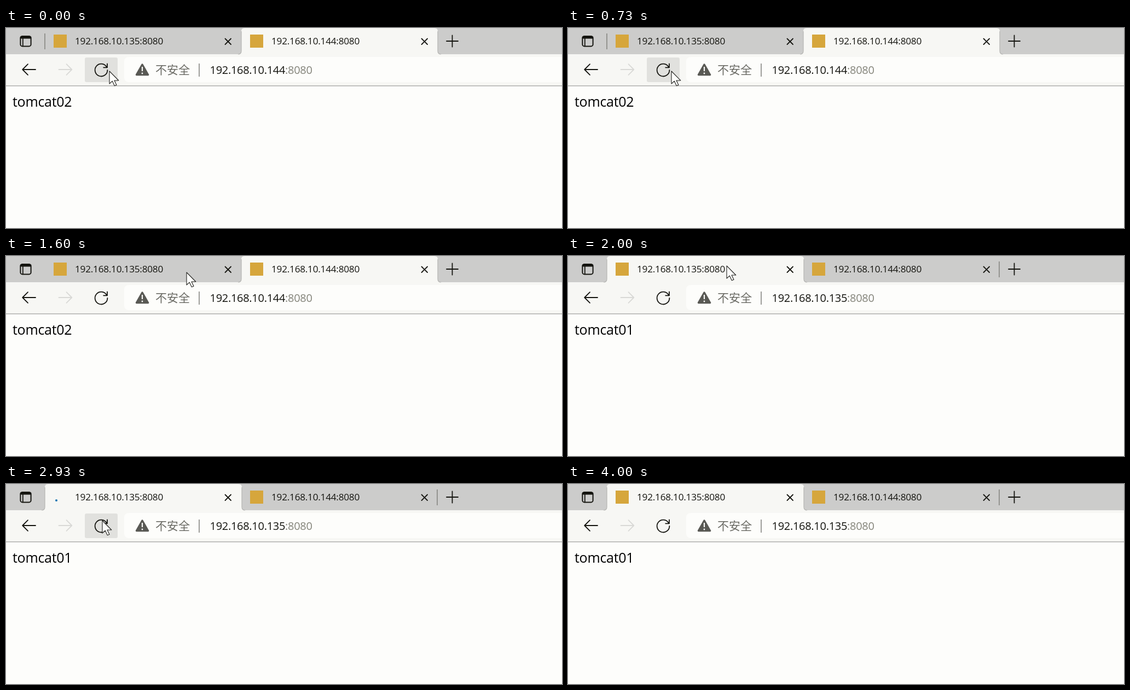
These frames come from a looping animation (1016 px wide and 366 px high, 4460 ms). An HTML page:

```html
<!DOCTYPE html>
<html lang="zh">
<head>
<meta charset="utf-8">
<title>Tabs</title>
<style>
html, body { margin: 0; width: 100%; height: 100%; overflow: hidden; background: #fdfdfb; }
svg { display: block; width: 1016px; height: 366px; }
text { font-family: "Open Sans", "Noto Sans", sans-serif; fill: #14140f; white-space: pre; }
.tab { font-size: 17.2px; letter-spacing: -.25px; }
.url { font-size: 20px; letter-spacing: -.3px; }
.page { font-size: 25px; letter-spacing: -.25px; fill: #000; }
.cjk { font: 21px "Noto Sans CJK SC", "Noto Sans CJK JP", "Noto Sans CJK", sans-serif; fill: #6a6a64; }
.port { fill: #84847a; }
.line { fill: none; stroke: #14140f; stroke-width: 1.8; stroke-linecap: round; stroke-linejoin: round; }
.rule { stroke: #858580; stroke-width: 1.6; }
</style>
</head>
<body>
<svg viewBox="0 0 1016 366">
  <rect width="1016" height="366" fill="#fdfdfb"/>
  <rect width="1016" height="48" fill="#cccccb"/>
  <rect y="48" width="1016" height="57" fill="#f7f7f4"/>
  <rect y="105" width="1016" height="1.6" fill="#b4b4b2"/>

  <path id="active" fill="#f7f7f4"/>
  <path id="edge" fill="none" stroke="#b5b5b3" stroke-width="1.2"/>
  <path id="split" class="rule"/>

  <g class="line">
    <rect x="26.4" y="15" width="19.2" height="18.4" rx="3.5" stroke-width="2"/>
    <path d="M27 16.7H45M27 18.3H45" stroke-width="2.6"/>
    <path d="M30.8 19V33"/>
  </g>
  <g id="tabs"></g>
  <path class="line" d="M805 24H826M815.5 13.5V34.5"/>

  <path class="line" d="M54 76H30.5M40 66.2L30.2 76 40 85.8"/>
  <path class="line" style="stroke:#d9d9d6" d="M96.5 76H120M110.5 66.2L120.3 76 110.5 85.8"/>
  <rect id="button" x="144" y="54" width="60" height="45" rx="3"/>
  <path class="line" d="M185.4 77A11.4 11.4 0 1 1 183.800 71.200M185 65.500V72.300H178.200"/>

  <rect x="216" y="53" width="820" height="46" rx="8" fill="#fdfdfb"/>
  <path d="M249 67L259.5 85.5H238.5Z" fill="#595954" stroke="#595954" stroke-width="3.5" stroke-linejoin="round"/>
  <path d="M249 71V79" stroke="#fdfdfb" stroke-width="2.2"/>
  <circle cx="249" cy="83" r="1.4" fill="#fdfdfb"/>
  <text class="cjk" x="273" y="84">不安全</text>
  <path id="bar" class="rule" d="M353 65V89"/>
  <text class="url" x="372.5" y="84"><tspan id="host"></tspan><tspan class="port">:8080</tspan></text>
  <text id="page" class="page" x="12" y="144"></text>

  <path id="cursor" d="M0 0V23L5.3 18.2 9.3 26.8 13 25.2 9 17H16.8Z" fill="#fdfdfb" stroke="#22221f" stroke-width="1.1" stroke-linejoin="round"/>
</svg>
<script>
const LOOP = 4460;
const HOSTS = ["192.168.10.135", "192.168.10.144"];
const $ = id => document.getElementById(id);

// time, x, y of the pointer tip; it finally leaves to the right
const PATH = [
  [0, 189, 79], [1130, 189, 79], [1200, 273, 68], [1400, 326, 34], [1600, 330, 30],
  [1930, 290, 18], [2200, 290, 18], [2600, 176, 67], [3400, 176, 67], [3730, 1030, 165]
];

$("tabs").innerHTML = HOSTS.map((host, i) => `
  <g transform="translate(${i * 359} 0)">
    <rect id="icon${i}" x="87" y="12" width="24" height="24" fill="#d6a63c"/>
    <circle id="dot${i}" cx="92" cy="30" r="2.1" fill="#1f78b4"/>
    <text class="tab" x="126" y="30">${host}:8080</text>
    <path class="line" d="M400.5 19.5L411 30M411 19.5L400.5 30"/>
  </g>`).join("");

// The picture refreshes twice in every 200 ms.
function step(t) {
  const base = Math.floor(t / 200) * 200;
  return Math.min(4000, t - base < 130 ? base : base + 130);
}

function pointer(t) {
  const i = PATH.findIndex(p => p[0] > t);
  if (i < 0) return PATH[PATH.length - 1].slice(1);
  const [t0, x0, y0] = PATH[i - 1], [t1, x1, y1] = PATH[i];
  const k = (t - t0) / (t1 - t0);
  return [x0 + (x1 - x0) * k, y0 + (y1 - y0) * k];
}

const within = (v, a, b) => v >= a && v < b;
const show = (id, on) => $(id).style.display = on ? "" : "none";

const leftSide = l => `M${l - 6} 48Q${l} 48 ${l} 42V6`;
const rightSide = r => `V42Q${r} 48 ${r + 6} 48`;

function draw(time) {
  const t = step(time);
  const tab = t < 1930 ? 1 : 0;
  const [x, y] = pointer(t);

  const [l, r] = tab ? [430, 789] : [71, 431];
  $("active").setAttribute("d",
    `${leftSide(l)}Q${l} 0 ${l + 6} 0H${r - 6}Q${r} 0 ${r} 6${rightSide(r)}Z`);
  $("edge").setAttribute("d", `${leftSide(l)}M${r} 6${rightSide(r)}`);
  $("split").setAttribute("d", tab ? "M71 10V39" : "M788 10V39");
  $("host").textContent = HOSTS[tab];
  $("page").textContent = "tomcat0" + (tab + 1);

  // Pointing at the idle first tab hides its divider.
  show("split", !(tab && within(x, 71, 431) && y < 48));

  const loading = within(t, 400, 530) || within(t, 2930, 3000);
  HOSTS.forEach((_, i) => {
    const busy = loading && i === tab;
    show("icon" + i, !busy);
    show("dot" + i, busy);
  });

  const over = within(x, 144, 204) && within(y, 54, 99);
  const pressed = within(t, 330, 400) || within(t, 2800, 2930);
  show("button", over || t < 1330);
  $("button").setAttribute("fill", pressed ? "#cfcfcc" : "#e1e1de");
  show("bar", !(within(x, 230, 345) && within(y, 54, 99)));

  show("cursor", x < 1016);
  $("cursor").setAttribute("transform", `translate(${x.toFixed(1)} ${y.toFixed(1)})`);
}

const start = performance.now();
function tick() {
  draw((performance.now() - start) % LOOP);
  requestAnimationFrame(tick);
}
tick();
</script>
</body>
</html>
```
